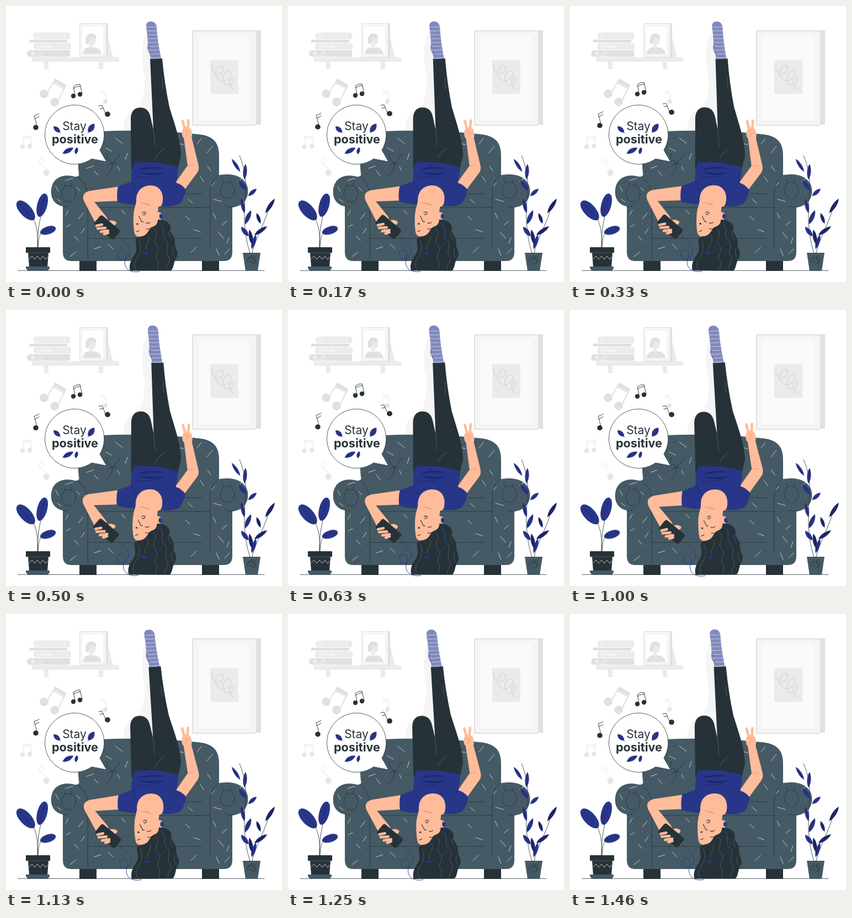
An HTML page that plays this animation: 500x500 px, repeating every 1500 ms.

```html
<!DOCTYPE html>
<html lang="en">
<head>
<meta charset="utf-8">
<title>Stay positive</title>
<style>
  html, body { margin: 0; width: 100%; height: 100%; overflow: hidden; background: #fff; }
  svg { display: block; width: 100%; height: 100%; }
  text { font: 21px Inter, sans-serif; text-anchor: middle; fill: #263238; }
  .bold { font-size: 21.6px; font-weight: 700; }
  .line { fill: none; stroke: #263238; stroke-width: .8; stroke-linecap: round; stroke-linejoin: round; }
  .dash { fill: none; stroke: #e5eaed; stroke-width: .8; stroke-linecap: round; }
  .dark { fill: #263238; }
  .sofa { fill: #455a64; }
  .blue { fill: #283689; }
  .skin { fill: #ffbc9b; }
  .finger { fill: none; stroke: #ffbc9b; stroke-width: 4.6; stroke-linecap: round; }
  .crease { stroke: #e58d6d; }
  .pale { fill: #ebebeb; }
  .grey { fill: #e0e0e0; }
</style>
</head>
<body>
<svg viewBox="0 0 500 500">
  <defs>
    <clipPath id="sockShape"><path id="sock" d="M254 39C253 31 257 28 263 28Q271 28 273 38Q274 60 281 95L262 96Q262 88 258 82Q255 77 257 71Q257 58 254 39Z"/></clipPath>
  </defs>

  <g id="shelf">
    <path class="pale" d="M47 93H205V101H176V114H168V101H77V114H69V101H47Z"/>
    <path class="pale" d="M53 48H115Q118 54 115 60H53Q46 54 53 48ZM52 67H116Q119 73 116 79H52Q47 73 52 67Z"/>
    <path class="grey" d="M42 61H111V66H42ZM44 80H116V92H44Q38 91 38 86T44 80Z"/>
    <path d="M56 48V60M60 48V60M107 48V60M56 67V79M60 67V79M110 67V79M62 80V92M66 80V92M54 90H61" fill="none" stroke="#f7f7f7"/>
    <circle cx="49" cy="86" r="4" class="pale"/>
    <text x="74" y="76" style="font-size:8px;font-weight:700;fill:#f8f8f8">nook</text>
    <path class="pale" d="M184 52L194 93H184Z"/>
    <path class="grey" d="M133 31H185V93H133Z"/>
    <path fill="#f5f5f5" d="M134 32H181V92H134Z"/>
    <path fill="#fff" d="M138 38H176V87H138Z"/>
    <path class="grey" d="M139 87Q140 75 151 75H161Q171 76 173 87Z"/>
    <path class="pale" d="M150 56H162Q165 69 157 71V76Q154 79 151 76Z"/>
    <path class="grey" d="M146 69Q142 62 146 56Q149 48 157 50Q164 51 163 60Q157 60 154 55Q154 64 149 69Z"/>
  </g>

  <g id="poster">
    <path class="grey" d="M453 44H462V215H453Z"/>
    <path class="grey" d="M337 44H453V217H337Z"/>
    <path fill="#f5f5f5" d="M339 46H453V215H339Z"/>
    <path fill="#fafafa" d="M349 55H441V206H349Z"/>
    <path class="pale" d="M370 98H421V159H370Z"/>
    <path d="M373 105C371 120 381 127 391 120C399 112 391 104 384 111C374 122 383 139 397 135C409 130 411 114 401 118C390 124 390 142 402 143C413 142 415 128 409 130C401 135 405 148 414 151" fill="none" stroke="#dedede" stroke-width="2.4"/>
  </g>

  <path fill="#f5f5f5" d="M212 228C213 202 223 187 241 183C248 172 254 140 250 122C245 100 244 62 257 45L275 95V230Z"/>

  <g id="paleNotes" fill="#e0e0e0" stroke="#e0e0e0" stroke-linejoin="round">
    <circle cx="69" cy="159" r="7.3"/><circle cx="88" cy="174" r="7.3"/>
    <path d="M75 157L89 133L108 144L94 172M86 139L105 149" fill="none" stroke-width="2"/>
    <path d="M89 132L108 143L106 147L87 137Z"/>
    <g fill="#e6e6e6" stroke="#e6e6e6">
      <circle cx="180" cy="173" r="3.8"/><circle cx="30" cy="255" r="3.8"/><circle cx="43" cy="254" r="3.8"/><circle cx="73" cy="302" r="5.2"/>
      <path d="M183 172L179 154L171 155M180 158L172 159M33 254L30 237L45 236L46 253M30 240L45 239M77 299L59 282L67 273M63 286L70 278" fill="none"/>
    </g>
  </g>

  <path class="line" d="M22 479.2H468"/>

  <g id="couch">
    <path class="dark" d="M133 455H164V480H133ZM355 455H386V480H355Z"/>
    <path class="sofa" d="M133 310C128 275 128 232 172 227Q260 223 345 232C373 234 386 245 386 270V320H133Z"/>
    <path class="sofa" d="M103 363C87 360 80 347 82 332C85 310 104 304 124 309Q132 311 136 300H374Q372 313 384 307C405 302 433 306 438 330C441 350 428 363 410 365V446Q410 462 395 462H118Q103 462 103 446Z"/>
    <g class="line">
      <path d="M103 363Q107 364 112 363M410 365Q402 365 397 362M148 458V345Q147 321 132 311M370 440V340Q370 317 384 307M148 365H370M148 421H355M310 340H356"/>
      <ellipse cx="114" cy="340" rx="13" ry="15"/>
      <ellipse cx="401" cy="334" rx="13" ry="15"/>
      <path d="M107 322V327M119 321V326M391 314L394 321M408 315L406 321M183 268C182 281 190 278 192 285C195 297 184 304 181 309M192 286Q200 280 206 268M184 290Q188 282 199 286"/>
    </g>
    <path class="dash" d="M198 239L211 249M180 257L191 263M160 299L167 307M146 294L158 290M202 291L206 298M220 267L216 278M300 235L305 242M310 249L322 251M354 240L346 250M374 254L364 266M365 290L371 299M352 309L358 318M378 320L372 326M90 327L95 336M108 316L121 312M128 329L134 335M93 350L100 355M113 370L108 379M140 375L131 386M124 417L131 425"/>
    <path class="dash" d="M109 400L117 396M126 446L116 454M142 403L136 412M160 440L172 436M185 431L194 440M210 370L216 377M325 380L333 388M340 405L352 409M345 437L335 447M330 350L338 357M375 375L380 385M400 390L391 397M385 410L394 421M405 440L396 449M381 440L386 452M376 350L390 354M420 318L428 312M400 430L404 420"/>
  </g>

  <g id="bubble">
    <path class="line" style="fill:#fff" d="M155 277A53.7 53.7 0 1 1 170 261L182 282Z"/>
    <text x="124" y="224.5">Stay</text>
    <text x="125" y="249" class="bold">positive</text>
    <path class="line" d="M103 267Q112 268 121 259M127 268V260M97 228L99 230M151 227L148 230" style="stroke:#283689"/>
  </g>

  <g id="woman">
    <path class="dark" d="M261 96L283 95Q287 140 296 183C306 216 317 245 317 272L311 296H227L226 208C225 192 232 184 243 184C254 184 260 191 262 202L267 224Q264 160 261 96Z"/>
    <path class="line" style="stroke:#52656e" d="M267 224L270 254M288 258Q277 263 271 276M283 130L284 150"/>
    <use href="#sock" fill="#7f89bd"/>
    <g id="stripes" clip-path="url(#sockShape)" fill="none" stroke="#cfd4e8" stroke-width=".9"></g>
    <path class="line" style="stroke-width:.6" d="M257 72L260 76M262 88Q261 84 258 82"/>

    <path class="skin" d="M205 327L151 335Q136 339 141 353L161 391Q167 399 173 404L188 395L182 382L160 355L206 353Z"/>
    <path class="skin" d="M322 335L347 301Q351 295 348 285L336 237L322 238L329 289L307 320Z"/>
    <path class="finger" d="M326 230L320 208M329 229L330.5 207"/>
    <path class="skin" d="M321 221Q329 216 335 223Q339 231 336 240Q327 246 320 237Q317 229 321 221Z"/>
    <path class="line crease" d="M323 225Q329 225 331 230M325 236Q328 233 328 229M330 289L340 288"/>

    <path class="blue" d="M232 284Q273 280 312 292Q311 308 308 320Q319 323 326 333Q322 350 315 358Q300 365 282 362L237 360Q218 360 202 355Q200 340 203 327L227 318Q226 300 232 284Z"/>
    <path class="line" style="stroke:#18225f" d="M239 309Q255 313 275 306M227 318Q232 325 235 333M308 320Q301 325 296 332"/>
    <path fill="#1b266b" d="M238 297Q260 288 287 294Q262 294 238 297ZM240 301Q263 311 289 301Q262 304 240 301Z"/>

    <path class="skin" d="M236 354C235 334 248 325 262 325C277 325 286 337 284 353Q283 364 276 364L275 373Q284 374 284 382L279 393L254 414Q237 423 233 412C230 397 230 373 234 363Z"/>
    <path fill="#e99470" d="M240 357Q256 355 263 363Q252 358 240 357Z"/>
    <path class="dark" d="M275 387C289 386 299 394 298 403C297 412 306 417 306 427C304 438 315 446 309 455C303 464 305 474 299 479.5H225C222 470 226 460 232 452C240 441 234 433 235 422Q238 418 248 417C260 412 257 402 268 399Q275 396 275 387Z"/>
    <path class="line" style="stroke:#52656e" d="M279 394C291 403 279 415 288 423C300 433 286 442 294 452C300 463 289 467 290 477M269 404C280 414 263 422 273 434C283 443 267 451 274 461C279 468 273 474 274 478M258 416C265 425 249 433 255 443M241 425C248 439 241 451 235 460Q230 468 235 477M297 406Q293 417 301 423M303 438Q300 448 305 455"/>

    <g class="line" style="stroke-width:1.1">
      <path d="M241 381L246 391L249 391M236 409L241 407M254 404Q260 405 264 402M254 393Q257 395 261 392"/>
      <path d="M247 375Q252 371 253 375Q252 379 248 378"/>
    </g>
    <ellipse class="dark" cx="238" cy="395" rx="1.9" ry="1.4"/>
    <path class="line crease" d="M277 376Q281 377 280 382"/>
    <ellipse class="blue" cx="281" cy="381" rx="3.2" ry="4.5"/>
    <path class="line" style="stroke:#283689;stroke-width:.9" d="M205 418C211 428 228 435 224 449C219 464 202 463 203 450C205 438 221 442 217 456C210 473 223 485 242 481M258 448C276 441 299 426 286 405Q281 397 282 384"/>
    <path class="blue" d="M246 447Q252 444 258 449Q251 453 246 447Z"/>

    <path class="skin" d="M183 390Q194 386 200 392Q200 397 193 398Z"/>
    <rect class="dark" x="160" y="390" width="46" height="22" rx="4" transform="rotate(40 183 401)"/>
    <path class="finger" d="M164 398L174 396M166 403L180 402M172 409L185 407M178 413L185 411"/>
    <path class="line crease" d="M168 401L177 400M172 406L182 405"/>
  </g>

  <g id="notes" class="dark">
    <ellipse cx="54" cy="220" rx="4.8" ry="4.6"/><circle cx="122" cy="163" r="4.2"/>
    <circle cx="134" cy="160" r="4.2"/><ellipse cx="184" cy="196" rx="4.9" ry="4.7"/>
    <path class="line" style="stroke-width:.9" d="M56 217L51 199Q55 198 60 195M52 204Q56 203 60 200M125 161L122 146Q128 141 134 142L138 159M123 149Q129 145 135 145M180 194L174 180L168 181M176 185L170 186"/>
  </g>

  <g id="pots">
    <path class="line" d="M57 437C59 414 55 394 48 383M57 437C57 410 60 390 65 375M58 437Q58 414 66 410"/>
    <path class="dark" d="M36 437H80V447H77L75 473H42L40 447H36Z"/>
    <path class="sofa" d="M36 472H79V475L76 480H40L36 475Z"/>
    <path class="line" style="stroke:#dfe5e8" d="M42 458L47 453L52 459L57 453L62 459L67 453L72 459L75 455"/>
    <path class="line" style="stroke:#52656e" d="M40 447H77"/>
    <path class="line" d="M442 447C431 415 430 375 434 340C436 310 431 290 423 271M446 447C450 425 469 395 480 355"/>
    <path class="sofa" d="M429 447H461L456 480H434Z"/>
    <path class="line" d="M438 458C445 448 452 455 444 462C434 468 434 457 443 457C454 457 453 467 444 468M449 452Q456 459 449 467"/>
  </g>
  <g id="leaves"></g>
</svg>
<script>
  const $ = id => document.getElementById(id);
  const LOOP = 1500;

  // Leaf from base to tip; round leaves carry their width further along.
  function leaf([x1, y1, x2, y2, width], round, color = '#283689') {
    const dx = x2 - x1, dy = y2 - y1, len = Math.hypot(dx, dy);
    const nx = -dy / len * width * .67, ny = dx / len * width * .67;
    const [a, b] = round ? [.05, 1] : [.25, .7];
    const at = (k, side) => `${x1 + dx * k + nx * side} ${y1 + dy * k + ny * side}`;
    return `<path fill="${color}" d="M${x1} ${y1}C${at(a, 1)} ${at(b, 1)} ${x2} ${y2}C${at(b, -1)} ${at(a, -1)} ${x1} ${y1}"/>
      <path class="line" style="stroke:#141c50;stroke-width:.5" d="M${x1} ${y1}L${at(.85, 0)}"/>`;
  }

  const houseplant = [[51, 387, 21, 354, 21], [60, 382, 71, 340, 18], [62, 411, 90, 402, 14]];
  const tallLeaves = [[424, 300, 409, 277, 6], [432, 314, 434, 286, 7], [435, 334, 421, 315, 8], [439, 344, 454, 331, 7],
    [432, 375, 426, 348, 7], [433, 395, 444, 370, 8], [439, 417, 426, 400, 8], [445, 440, 453, 414, 7]];
  const sideLeaves = [[450, 415, 473, 399, 7], [461, 394, 454, 375, 6], [470, 375, 487, 349, 7], [446, 432, 441, 405, 7]];
  const bubbleLeaves = [[98, 229, 86, 218, 8], [149, 229, 160, 213, 10], [103, 267, 122, 257, 8], [126, 268, 129, 256, 6]];

  $('leaves').innerHTML = [
    ...houseplant.map(l => leaf(l, true)),
    ...tallLeaves.map(l => leaf(l)),
    ...sideLeaves.map(l => leaf(l, false, '#1c2668')),
    ...bubbleLeaves.map(l => leaf(l)),
  ].join('');

  let stripes = '';
  for (let y = 38; y < 95; y += 7) stripes += `<path d="M250 ${y}Q266 ${y + 1} 284 ${y - 1}"/>`;
  $('stripes').innerHTML = stripes;

  function draw(time) {
    const phase = time % LOOP / LOOP * 2 * Math.PI;
    $('woman').setAttribute('transform', `rotate(${.85 * Math.sin(phase)} 272 270)`);
    $('notes').setAttribute('transform', `translate(0 ${4.4 * (Math.cos(phase) - 1)})`);
  }

  const start = performance.now();
  function tick() {
    draw(performance.now() - start);
    requestAnimationFrame(tick);
  }
  tick();
</script>
</body>
</html>
```
